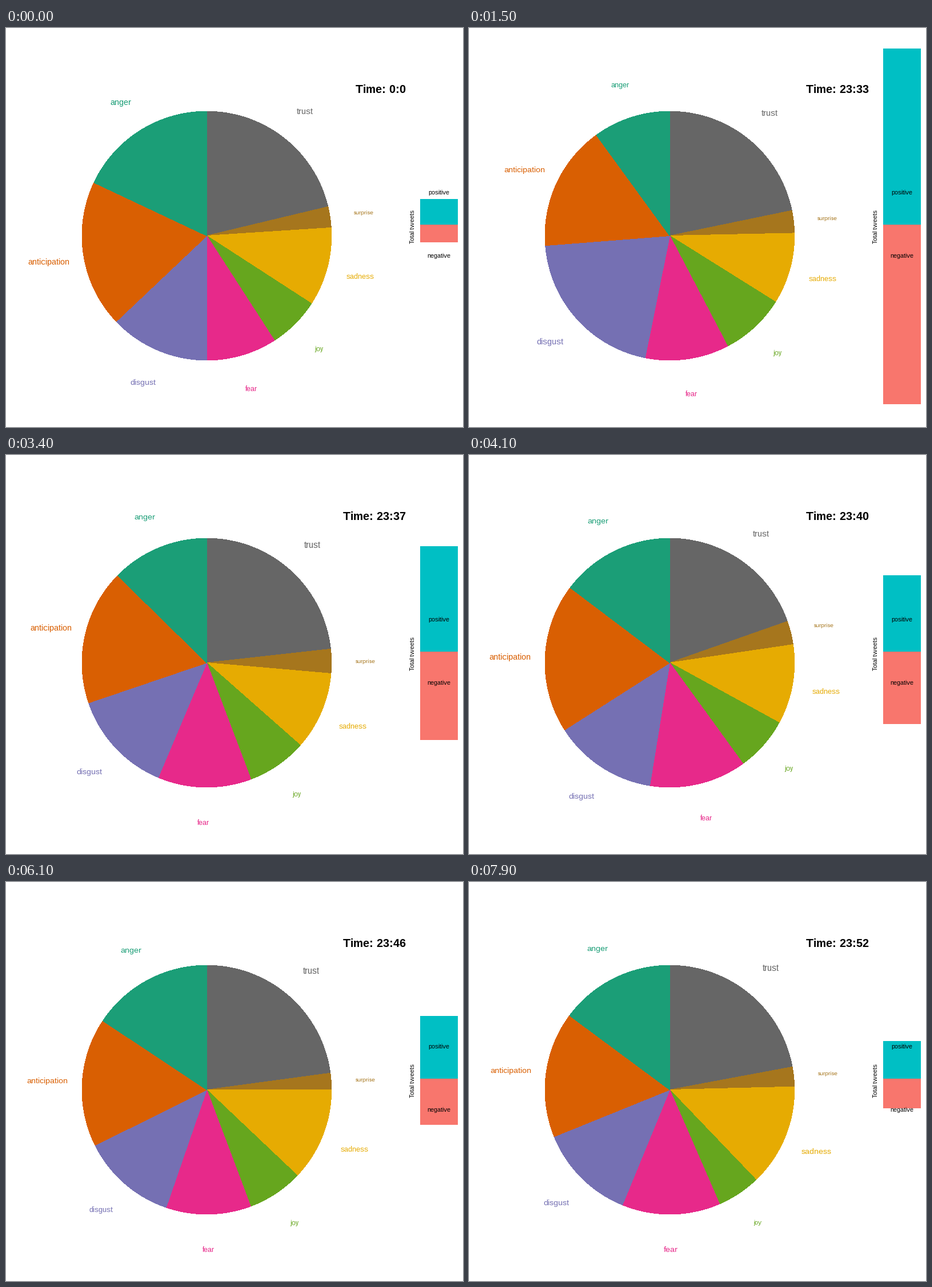
A matplotlib script for the animation above (8000 ms loop, 800 by 700 pixels).

```python
import numpy as np
import matplotlib as mpl
import matplotlib.pyplot as plt
from matplotlib.animation import FuncAnimation
from matplotlib.patches import Polygon, Rectangle

W, H, DPI = 800, 700, 100
PT = 72 / DPI
mpl.rcParams.update({
    "font.family": "Liberation Sans",
    "text.hinting": "default",
    "text.hinting_factor": 1,
})

# Slices in clockwise order, starting at twelve o'clock
SLICES = {
    "trust": "#666666", "surprise": "#A6761D", "sadness": "#E6AB02",
    "joy": "#66A61E", "fear": "#E7298A", "disgust": "#7570B3",
    "anticipation": "#D95F02", "anger": "#1B9E77",
}
DISGUST = list(SLICES).index("disgust")

# Key points: minute, end angles of the first seven slices, bar heights up and down
KEYS = np.array([
    [29, 76.5, 86.3, 123, 147.2, 180, 226.5, 295.3, 45, 31],
    [33, 78.3, 88.8, 122.1, 152.4, 191.4, 265.5, 324, 309, 315],
    [36, 91.5, 103, 139.1, 168.4, 211.1, 259.5, 318.9, 215, 172],
    [40, 70.6, 81.6, 118.8, 144.1, 189.2, 237.4, 307.1, 134, 127],
    [43.5, 90.7, 100.8, 140, 168.9, 203.7, 239, 308.1, 143, 110],
    [48.5, 76.7, 82.6, 129.2, 153.1, 195.9, 246.5, 300.7, 88, 61],
    [52.5, 79.4, 88.6, 136.3, 156.5, 202.3, 247.9, 306.6, 66, 52],
])

PIE_X, PIE_Y, PIE_R = 351.4, 364.5, 218.3
LABEL_X, LABEL_Y, LABEL_R = 350.5, 365, 279
BAR_X, BAR_W, ZERO = 725, 66, 345


def minute_at(n):
    """Hold each minute, with one halfway step before the next."""
    if n < 3:
        return 29.5 if n == 2 else 29
    first, start, length = (30, 3, 4) if n < 35 else (38, 35, 3)
    step, rest = divmod(n - start, length)
    return first + step + (0.5 if rest == length - 1 else 0)


def state(minute):
    """Slice edges in degrees and the two bar heights."""
    *ends, up, down = (np.interp(minute, KEYS[:, 0], col) for col in KEYS.T[1:])
    spans = np.diff([0, *ends, 360])
    # Disgust swells for a moment early on
    spans[DISGUST] *= 1 + 0.6 * np.sin(np.pi * np.clip((minute - 30) / 3, 0, 1))
    edges = np.append(0, np.cumsum(spans) * 360 / spans.sum())
    return edges, round(up), round(down)


def clock(minute):
    f = min(minute - 29, 1)
    mins = int(minute) if minute >= 30 else int(30 * f)
    return f"Time: {int(23 * f)}:{mins}"


def slice_shape(a0, a1):
    a = np.radians(np.linspace(a0, a1, 60))
    x = PIE_X + PIE_R * np.sin(a)
    y = PIE_Y - PIE_R * np.cos(a)
    return np.vstack([[PIE_X, PIE_Y], np.column_stack([x, y])])


fig = plt.figure(figsize=(W / DPI, H / DPI), dpi=DPI, facecolor="white")
ax = fig.add_axes([0, 0, 1, 1])
ax.set_xlim(0, W)
ax.set_ylim(H, 0)
ax.axis("off")


def put(x, y, text, px, **kw):
    opts = dict(ha="center", va="baseline", color="black", zorder=5) | kw
    return ax.text(x, y, text, fontsize=px * PT, **opts)


def bar(color):
    return ax.add_patch(Rectangle((BAR_X, ZERO), BAR_W, 1, fc=color, lw=0, aa=False))


wedges = [ax.add_patch(Polygon(slice_shape(0, 1), fc=c, lw=0, aa=False))
          for c in SLICES.values()]
labels = [put(0, 0, name, 12, color=c) for name, c in SLICES.items()]
pos, neg = bar("#00BFC4"), bar("#F8766D")

put(757.5, 292, "positive", 11)
put(757.5, 403, "negative", 11)
put(715, 349, "Total tweets", 11, rotation=90, rotation_mode="anchor")
title = put(700.5, 114, "", 20, ha="right", weight="bold")


def draw(n):
    minute = minute_at(n)
    edges, up, down = state(minute)
    for wedge, label, a0, a1 in zip(wedges, labels, edges, edges[1:]):
        wedge.set_xy(slice_shape(a0, a1))
        mid = np.radians((a0 + a1) / 2)
        px = round(7.1 + 18 * np.sqrt((a1 - a0) / 360))
        label.set_fontsize(px * PT)
        label.set_position((LABEL_X + LABEL_R * np.sin(mid),
                            LABEL_Y - LABEL_R * np.cos(mid) + 0.36 * px))
    pos.set_y(ZERO - up)
    pos.set_height(up)
    neg.set_height(down)
    title.set_text(clock(minute))
    return [*wedges, *labels, pos, neg, title]


anim = FuncAnimation(fig, draw, frames=80, interval=100,
                     repeat=True, repeat_delay=0, blit=False)
plt.show()
```
